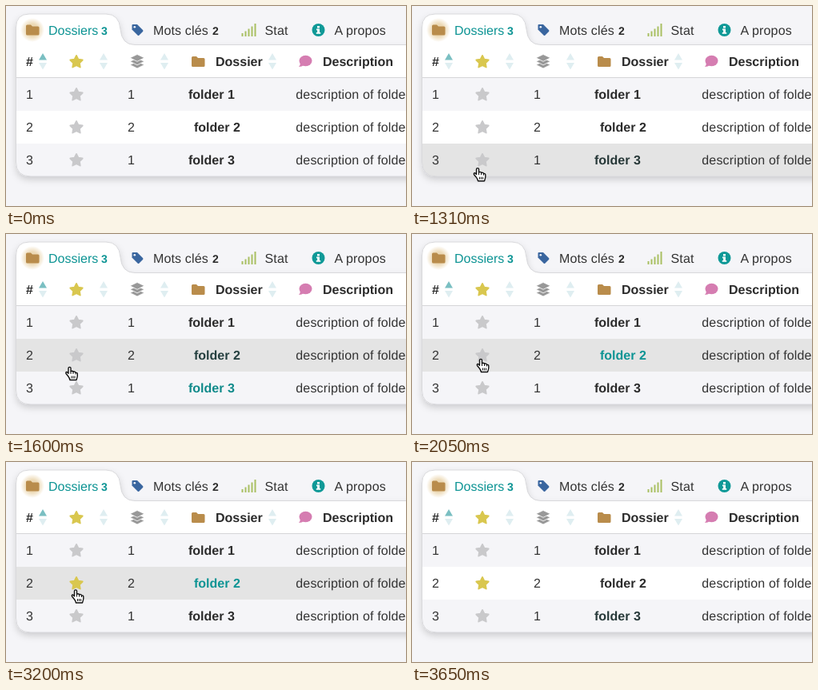
Recreate the animation shown at these times as an HTML page. Size 500 px wide and 250 px high, loop 4490 ms.

```html
<!DOCTYPE html>
<html lang="fr">
<head>
<meta charset="utf-8">
<style>
html, body { margin: 0; width: 100%; height: 100%; overflow: hidden; background: #f5f5f8; }
svg { display: block; }
text { font: 16px "Liberation Sans", Arial, sans-serif; fill: #333; letter-spacing: .15px; text-rendering: geometricPrecision; }
.b { font-weight: bold; fill: #2b2b2b; letter-spacing: 0; }
.n { font-size: 14px; }
.on { fill: #0d9494; letter-spacing: 0; }
.star { stroke-width: 1.8; stroke-linejoin: round; }
</style>
</head>
<body>
<svg id="stage" width="500" height="250" viewBox="0 0 500 250"></svg>
<script>
const LOOP = 4490, ROWS = [110, 151, 192];
const GOLD = '#d9c74f', GREY = '#c9c9cb', PALE = '#dfeef1';

const text = (x, y, s, cls = '', id = '') =>
  `<text x="${x}" y="${y}" class="${cls}" id="${id}">${s}</text>`;

const starPoints = Array.from({ length: 10 }, (_, i) => {
  const r = i % 2 ? 4.1 : 8.1, a = i * Math.PI / 5;
  return [r * Math.sin(a), -r * Math.cos(a)].map(v => v.toFixed(2));
}).join(' ');
const star = (y, color, id = '') =>
  `<polygon id="${id}" class="star" points="${starPoints}" fill="${color}" stroke="${color}" transform="translate(88 ${y + 1})"/>`;

const sorter = (x, up = PALE) =>
  `<path d="M${x - 5} 67.500l5-8.500 5 8.500z" fill="${up}"/><path d="M${x - 5} 71h10l-5 8.500z" fill="${PALE}"/>`;

const folder = (x, y) =>
  `<path transform="translate(${x} ${y})" fill="#b98c4b" d="M1.500 0H6l2 2h7q1.500 0 1.500 1.500v8q0 1.500-1.500 1.500H1.500Q0 13 0 11.500v-10Q0 0 1.500 0z"/>`;

const panel = 'M12.500 195V27Q12.500 10 29 10H125Q141.500 10 143 29Q144.500 48.500 161 48.500H520V213H31Q12.500 213 12.500 195z';

const bars = [4, 6.5, 9.5, 12.5, 16].map((h, i) =>
  `<rect x="${294.5 + i * 4}" y="${38 - h}" width="2" height="${h}" fill="#a9c062"/>`).join('');

const rows = ROWS.map((y, i) =>
  `<rect id="row${i + 1}" x="12" y="${y - 20}" width="490" height="41"/>`).join('');

const cells = ROWS.map((y, i) =>
  text(25, y + 6, i + 1) + star(y, GREY, 'star' + (i + 1)) +
  text(152, y + 6, [1, 2, 1][i]) +
  text(i === 1 ? 235 : 228, y + 6, 'folder ' + (i + 1), 'b', 'link' + (i + 1)) +
  text(362.3, y + 6, 'description of folder ' + (i + 1))).join('');

stage.innerHTML = `
<defs>
  <clipPath id="clip"><path d="${panel}"/></clipPath>
  <filter id="shade" x="-10%" y="-10%" width="120%" height="130%">
    <feDropShadow dx="0" dy="4" stdDeviation="4" flood-opacity=".17"/>
  </filter>
  <radialGradient id="glow">
    <stop offset=".5" stop-color="#ecd9b5"/><stop offset="1" stop-color="#ecd9b5" stop-opacity="0"/>
  </radialGradient>
</defs>
<path d="${panel}" fill="#fff" filter="url(#shade)"/>
<g clip-path="url(#clip)">${rows}</g>
<path d="M13 89.500H500" stroke="#d6d6d8"/>
<path d="${panel}" fill="none" stroke="#d9d9dc"/>

<circle cx="33" cy="30" r="15" fill="url(#glow)"/>
${folder(25, 23.5)}
${text(53, 36, 'Dossiers', 'on')}${text(119, 36, 3, 'b n on')}
<path d="M158.500 23h5.500l7 7q1 1 0 2l-4.500 4.500q-1 1-2 0L157.500 29.500v-5.500q0-1 1-1z" fill="#3a669f"/>
<circle cx="160.800" cy="26.300" r="1.300" fill="#f5f5f8"/>
${text(184, 36, 'Mots clés')}${text(258, 36, 2, 'b n')}
${bars}${text(323.5, 36, 'Stat')}
<circle cx="390.500" cy="30" r="8" fill="#0f9997"/>
<path d="M389 25h3v2.500h-3zM388 28.500h4v4.500h1.200v1.700h-5.400v-1.700h1.300v-2.800h-1.100z" fill="#fff"/>
${text(410.5, 36, 'A propos')}

${text(25, 75, '#', 'b')}${sorter(46, '#7abfc2')}
${star(69, GOLD)}${sorter(122)}
<g fill="#989898" stroke="#fff" stroke-width=".8">
  <path d="M164 69.500l9 4-9 4.500-9-4.500z"/><path d="M164 65.300l9 4-9 4.500-9-4.500z"/><path d="M164 60.500l9 4.300-9 4.500-9-4.500z"/>
</g>
${sorter(198)}
${folder(232, 63)}${text(262, 75, 'Dossier', 'b')}${sorter(333)}
<ellipse cx="374.500" cy="68.500" rx="8" ry="6.700" fill="#d57db1"/>
<path d="M368 70q0 4-2 6 4 0 6-2z" fill="#d57db1"/>
${text(396, 75, 'Description', 'b')}
${cells}
${star(ROWS[1], GOLD, 'halo')}
<g id="hand" stroke="#111" stroke-linejoin="round">
  <path fill="#fff" stroke-width="1.400" d="M-2.500 11.500L-5 8.500Q-5.700 6.300-3.800 6.500L-2 8.200V1.800Q-2 .4-.5 .4Q1 .4 1 1.800V6Q1.500 5.200 2.600 5.200Q4 5.200 4 6.400Q5 5.700 6 6.200Q7 6.500 7 7.400Q9.300 7 9.300 9V11.500Q9 13.500 8 16.500H0Q-.5 14-2.500 11.500z"/>
  <path fill="none" d="M1 6v3M4 6.500v2.500M7 7.500v2M2 11.500v3M4 11.500v3M6 11.500v3"/>
</g>`;

const el = id => document.getElementById(id);
const set = (id, attrs) => {
  for (const k in attrs) el(id).setAttribute(k, attrs[k]);
};

// Bursts of movement: start, end, intervals
const BURSTS = [[1020, 1540, 9], [1600, 2050, 8], [2470, 2980, 9], [3150, 3650, 9]];
const HAND = [[1020, 90.5, 248.7], [1310, 82.5, 202], [1540, 80.5, 174], [1600, 80, 166], [1830, 84, 158.5],
  [2050, 86.5, 156], [3094, 86.5, 156], [3206, 88.5, 163], [3317, 93.7, 181], [3594, 103, 245]];
const LINK2 = [[1540, 0], [1600, .2], [1850, 1], [3206, 1], [3317, .85], [3480, 0]];
const LINK3 = [[1250, 0], [1310, .13], [1530, 1], [1600, .9], [1830, 0], [3206, 0],
  [3317, .13], [3430, .7], [3480, .75], [3650, .13]];

function snap(t) {
  const burst = BURSTS.filter(b => b[0] <= t).pop();
  if (!burst) return 0;
  const [a, b, n] = burst, step = (b - a) / n;
  return a + Math.min(n, Math.floor((t - a) / step + 1e-6)) * step;
}

function at(keys, t) {
  const i = keys.findIndex(k => k[0] > t);
  if (i < 0) return keys[keys.length - 1].slice(1);
  if (!i) return keys[0].slice(1);
  const a = keys[i - 1], b = keys[i], p = (t - a[0]) / (b[0] - a[0]);
  return a.slice(1).map((v, j) => v + (b[j + 1] - v) * p);
}

const linkColor = k => `fill: rgb(${[[43, 13], [43, 148], [43, 148]].map(([a, b]) => Math.round(a + (b - a) * k))})`;

function draw(now) {
  const t = snap(now % LOOP);
  const shown = t >= 1020 && t < 3649;
  const [x, y] = at(HAND, t);
  set('hand', { transform: `translate(${x} ${y})`, visibility: shown ? 'visible' : 'hidden' });

  const hover = !shown || y >= 213 ? 0 : y < 171.9 ? 2 : 3;
  for (const n of [1, 2, 3]) {
    set('row' + n, { fill: n === hover ? '#e4e4e4' : n === 2 ? '#fff' : '#f5f5f8' });
  }
  set('link2', { style: linkColor(at(LINK2, t)[0]) });
  set('link3', { style: linkColor(at(LINK3, t)[0]) });

  const starColor = t >= 2470 ? GOLD : GREY;
  set('star2', { fill: starColor, stroke: starColor });
  const p = Math.min(1, Math.max(0, (t - 2470) / 510));
  set('halo', {
    transform: `translate(88 ${ROWS[1] + 1}) scale(${1 + 1.5 * p ** .8})`,
    opacity: t < 2470 ? 0 : 1 - p
  });
}

const start = performance.now();
function tick() {
  draw(performance.now() - start);
  requestAnimationFrame(tick);
}
tick();
</script>
</body>
</html>
```
